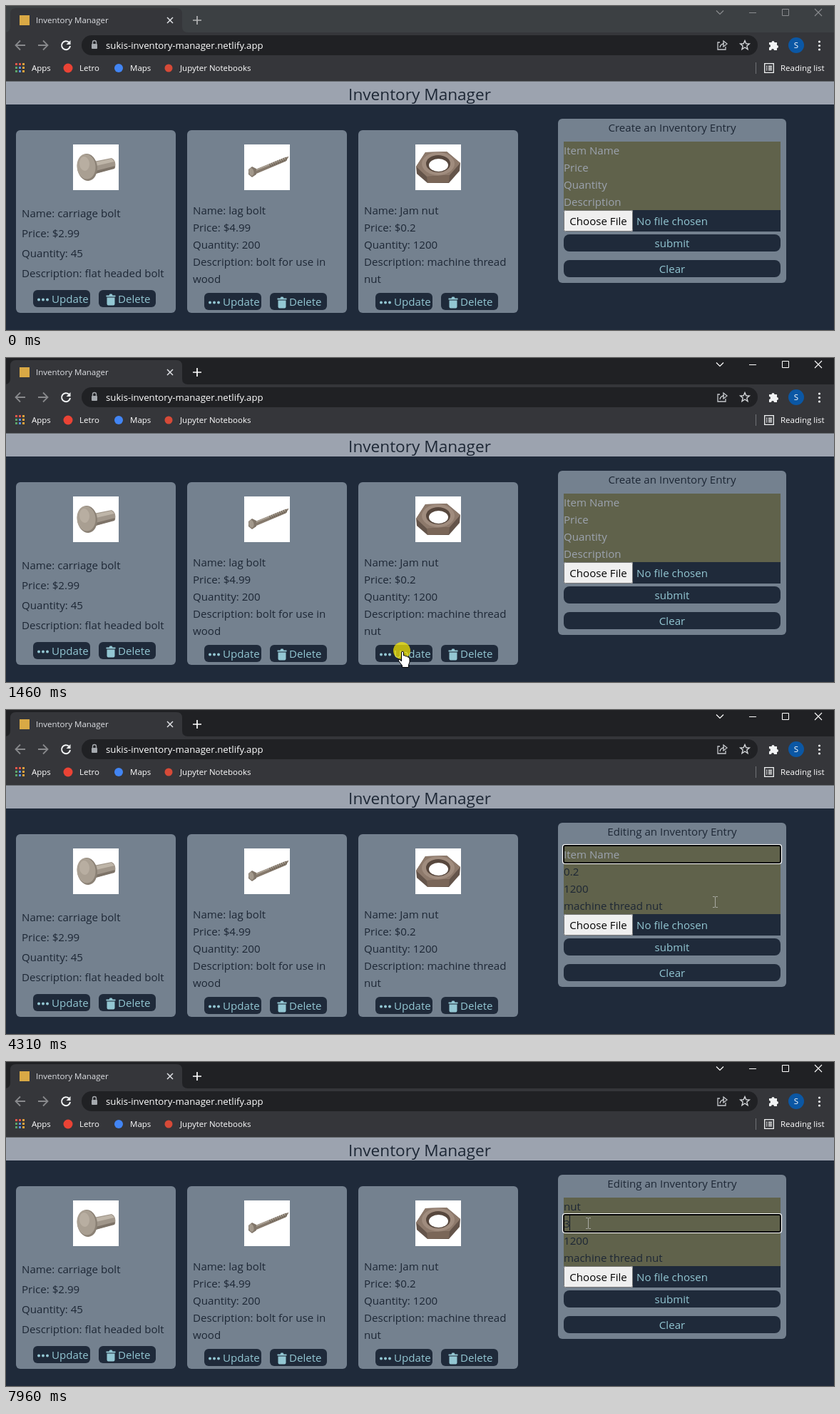
An HTML page with a canvas for the animation above (8 s loop, 1161 px wide and 454 px high).

```html
<!DOCTYPE html>
<html lang="en">
<head>
<meta charset="utf-8">
<title>Inventory Manager</title>
<style>
  html, body { margin: 0; width: 100%; height: 100%; overflow: hidden; background: #1f2937; }
  canvas { display: block; }
</style>
</head>
<body>
<canvas id="stage" width="1161" height="454"></canvas>
<script>
const c = document.getElementById('stage').getContext('2d');
const LOOP = 8000, STEP = 67;
const NAVY = '#1f2a3a', CARD = '#74818f', SKY = '#93c7d3', OLIVE = '#60624b';
const BAR = '#35363a', PALE = '#9ca3af', INK = '#1d2735', LIGHT = '#f1f3f4';
const BODY = 15.1, SMALL = 11.5;

// ---- drawing helpers ----
function text(s, x, y, size, color, align = 'left', weight = 400) {
  c.font = `${weight} ${size}px "Open Sans", "Noto Sans", sans-serif`;
  c.textAlign = align;
  c.fillStyle = color;
  c.fillText(s, x, y);
}
function width(s) {
  c.font = `${BODY}px "Open Sans", "Noto Sans", sans-serif`;
  return c.measureText(s).width;
}
function rect(x, y, w, h, color) {
  c.fillStyle = color;
  c.fillRect(x, y, w, h);
}
function round(x, y, w, h, r, color) {
  c.beginPath();
  c.roundRect(x, y, w, h, r);
  c.fillStyle = color;
  c.fill();
}
function frame(x, y, w, h, r, color, line) {
  c.beginPath();
  c.roundRect(x, y, w, h, r);
  c.strokeStyle = color;
  c.lineWidth = line;
  c.stroke();
}
function oval(x, y, rx, ry, turn, color) {
  c.beginPath();
  c.ellipse(x, y, rx, ry, turn, 0, 7);
  c.fillStyle = color;
  c.fill();
}
const dot = (x, y, r, color) => oval(x, y, r, r, 0, color);
// SVG path placed at x, y
function path(d, x, y, fill, stroke, line = 1) {
  const p = new Path2D(d);
  c.save();
  c.translate(x, y);
  if (fill) { c.fillStyle = fill; c.fill(p); }
  if (stroke) { c.strokeStyle = stroke; c.lineWidth = line; c.stroke(p); }
  c.restore();
}

// ---- browser frame ----
function drawBrowser(active) {
  rect(0, 0, 1161, 37, active ? '#202124' : '#3c4043');
  path('M-2 37Q6 37 6 29V11Q6 3 14 3H239Q247 3 247 11V29Q247 37 255 37Z', 0, 0, BAR);
  rect(0, 37, 1161, 68, BAR);
  rect(0, 105, 1161, 1, '#5f6368');
  rect(19, 13, 14, 14, '#d9a945');
  text('Inventory Manager', 42, 24, SMALL, '#dfe1e5');
  path('M-4 -4L4 4M4 -4L-4 4', 230, 20, null, '#dfe1e5', 1.5);
  path('M-6 0H6M0 -6V6', 268, 20, null, active ? '#fff' : '#b4b5b7', 1.7);

  const ctl = active ? '#fff' : '#8a8c8f';
  path('M-5 -2.5L0 2.5L5 -2.5', 1001, 9, null, ctl, 1.2);
  path('M-5 .5H5', 1047, 9, null, ctl);
  path('M-4.5 -4.5H4.5V4.5H-4.5Z', 1093, 9, null, ctl);
  path('M-5 -5L5 5M5 -5L-5 5', 1139, 9, null, ctl, 1.1);

  const arrow = 'M7 0H-6M0 -6.5L-6.5 0L0 6.5';
  path(arrow, 20, 55, null, '#88898c', 1.8);
  c.save();
  c.translate(52, 55);
  c.scale(-1, 1);
  path(arrow, 0, 0, null, '#88898c', 1.8);
  c.restore();
  path('M4.2 -4.2A6 6 0 1 0 6 1', 84, 55, null, LIGHT, 2);
  path('M6.5 -7V-1H.5Z', 84, 55, LIGHT);

  round(106, 41, 948, 28, 14, '#202124');
  round(120, 53, 8, 7, 1, '#a5a9ae');
  path('M-2.5 0V-2A2.5 2.5 0 0 1 2.5 -2V0', 124, 53, null, '#a5a9ae', 1.4);
  text('sukis-inventory-manager.netlify.app', 140, 60, 13.2, '#fff', 'left', 500);
  path('M-3 -4H-6V6H5V2M-3 3Q-2 -2 3 -2M2 -6L7 -2L2 2Z', 1004, 55, null, '#c6c9cd', 1.3);
  path('M0 -6.5L1.8 -2.2L6.3 -2L2.8 1L4 5.6L0 3L-4 5.6L-2.8 1L-6.3 -2L-1.8 -2.2Z', 1036, 55, null, '#d2d5d8', 1.4);
  path('M-6 -4H-2.5A2 2 0 1 1 1.5 -4H5V0A2 2 0 1 1 5 4V7H1A2 2 0 1 0 -3 7H-6V3A2 2 0 1 0 -6 -1Z', 1076, 55, LIGHT);
  dot(1108, 55, 11, '#0b57a4');
  text('S', 1108, 59, 11.5, '#fff', 'center');
  for (const y of [50, 55.5, 61]) dot(1140.5, y, 1.6, LIGHT);

  const hues = ['#e8574a', '#e8574a', '#e8a33c', '#5aa469', '#5b8fe0', '#e8a33c', '#5aa469', '#5b8fe0', '#e8a33c'];
  hues.forEach((h, i) => rect(13 + i % 3 * 5, 80 + Math.floor(i / 3) * 5, 3, 3, h));
  dot(87, 87, 6.5, '#ea4335');
  dot(158, 87, 6, '#4285f4');
  dot(228, 87, 5.5, '#d64a38');
  const marks = [['Apps', 36], ['Letro', 103], ['Maps', 174], ['Jupyter Notebooks', 244], ['Reading list', 1086]];
  for (const [s, x] of marks) text(s, x, 91, SMALL, '#fff', 'left', 500);
  rect(1051, 79, 1, 16, '#707276');
  path('M.7 .7H13.3V13.3H.7ZM3 4.5H4.5M6 4.5H11M3 7H4.5M6 7H11M3 9.5H4.5M6 9.5H11', 1063, 80, null, LIGHT, 1.3);
}

// ---- product pictures, 64 by 64 ----
function carriageBolt() {
  path('M24 25L54 19Q61 22 59 33L28 42Z', 0, 0, '#a0968a');
  path('M26 26L54 20L58 24L28 31Z', 0, 0, '#beb5a8');
  path('M28 38L59 30L58 34L28 42Z', 0, 0, '#7d7368');
  oval(20, 32, 14, 19, -.1, '#8b8175');
  oval(18.500, 31, 13, 17.500, -.1, '#a99f92');
  oval(16, 27, 7, 10, -.1, '#b8aea1');
}
function lagBolt() {
  path('M13 37L56 19.500L61 18L58 23L15 41Z', 0, 0, '#85796c', '#85796c', 1.5);
  path('M14 37L59 19', 0, 0, null, '#ada396', 1.6);
  c.setLineDash([1, 2]);
  path('M36 29.500L60 19.500', 0, 0, null, '#6d6357', 5);
  c.setLineDash([]);
  path('M6 35L11 31L17 34L17 42L11 46L6 42Z', 0, 0, '#81766a');
  oval(10, 38.5, 3.500, 5.500, -.2, '#a2988b');
}
function jamNut() {
  path('M1 31L14 11L44 10L63 26L62 37L47 54L17 54L2 41Z', 0, 0, '#64544a');
  path('M1 31L14 11L44 10L63 26L48 43L16 45Z', 0, 0, '#8d796b');
  path('M16 45L48 43L47 53L17 54Z', 0, 0, '#7a6658');
  oval(32, 27, 23, 16, 0, '#a08c7e');
  oval(32, 27, 17, 12, 0, '#57473d');
  oval(32.5, 29, 13.5, 9, 0, '#fff');
}

// ---- inventory cards ----
const cards = [
  { x: 14, top: 296, gap: 28, button: 398, draw: carriageBolt,
    lines: ['Name: carriage bolt', 'Price: $2.99', 'Quantity: 45', 'Description: flat headed bolt'] },
  { x: 254, top: 292, gap: 24, button: 402, draw: lagBolt,
    lines: ['Name: lag bolt', 'Price: $4.99', 'Quantity: 200', 'Description: bolt for use in', 'wood'] },
  { x: 494, top: 292, gap: 24, button: 402, draw: jamNut,
    lines: ['Name: Jam nut', 'Price: $0.2', 'Quantity: 1200', 'Description: machine thread', 'nut'] }
];
function drawCard({ x, top, gap, button, draw, lines }) {
  round(x, 174, 224, 256, 6, CARD);
  rect(x + 80, 194, 64, 64, '#fff');
  c.save();
  c.translate(x + 80, 194);
  draw();
  c.restore();
  lines.forEach((s, i) => text(s, x + 8, top + i * gap, BODY, INK));
  round(x + 24, button, 80, 24, 6, NAVY);
  round(x + 116, button, 80, 24, 6, NAVY);
  for (let i = 0; i < 3; i++) dot(x + 32 + i * 6, button + 13.5, 2, SKY);
  text('Update', x + 50, button + 18, BODY, SKY);
  path('M0 2H4L5 0H8L9 2H13V4H0ZM1 5H12V14Q12 16 10 16H3Q1 16 1 14Z', x + 126.5, button + 5.5, SKY);
  text('Delete', x + 143, button + 18, BODY, SKY);
}

// ---- form ----
const EDIT = 1590, FOCUS = [2610, 6400];
const hints = ['Item Name', 'Price', 'Quantity', 'Description'];
const stored = ['Jam nut', '0.2', '1200', 'machine thread nut'];
// typed values of the first two fields: [time, value]
const edits = [
  [[3510, 'Jam nu'], [3640, 'Jam n'], [3780, 'Jam '], [3890, 'Jam'], [4000, 'Ja'], [4110, 'J'],
   [4310, ''], [5040, 'n'], [5230, 'nu'], [5370, 'nut']],
  [[7370, ''], [7960, '3']]
];
function fieldState(i, t) {
  let value = t < EDIT ? '' : stored[i], last = FOCUS[i] || 0;
  for (const [at, v] of edits[i] || []) if (t >= at) { value = v; last = at; }
  return { value, last };
}
function drawForm(t) {
  const focus = t < FOCUS[0] ? -1 : t < FOCUS[1] ? 0 : 1;
  round(774, 158, 320, 230, 6, CARD);
  text((t < EDIT ? 'Create' : 'Editing') + ' an Inventory Entry', 934, 176, BODY, INK, 'center');
  rect(782, 190, 304, 96, OLIVE);
  hints.forEach((hint, i) => {
    const { value, last } = fieldState(i, t);
    text(value || hint, 782, 208 + i * 24, BODY, value ? INK : PALE);
    if (i === focus && value && (t - last) % 1000 < 500)
      rect(Math.round(782 + width(value)) - 1, 191 + i * 24, 1, 21, '#111827');
  });
  rect(782, 286, 304, 30, NAVY);
  round(782, 286, 97, 30, 2, '#efefef');
  frame(782.5, 286.5, 96, 29, 2, '#777', 1);
  text('Choose File', 830.5, 307, BODY, '#000', 'center');
  text('No file chosen', 884, 307, BODY, SKY);
  round(782, 320, 304, 24, 8, NAVY);
  text('submit', 934, 338, BODY, SKY, 'center');
  round(782, 356, 304, 24, 8, NAVY);
  text('Clear', 934, 374, BODY, SKY, 'center');
  if (focus >= 0) {
    const y = 188 + focus * 24;
    frame(782, y + 2, 304, 24, 2, '#000', 2);
    frame(780.5, y + .5, 307, 27, 3.5, '#fff', 1.2);
  }
}

// ---- pointer ----
const track = [
  [850, 655, 480], [1390, 556, 411], [1650, 556, 411], [1720, 558, 410], [1780, 559, 413],
  [1913, 559, 413], [2250, 869, 232], [2560, 893, 205], [2710, 893, 206], [2780, 894, 219],
  [2850, 946, 246], [2910, 994, 269], [5773, 994, 269], [5840, 982, 263], [6370, 799, 228],
  [6570, 796, 226], [6973, 796, 226], [7230, 816, 226]
];
const presses = [[1390, 1590], [2610, 2720], [6370, 6470]];

function pointerAt(t) {
  if (t >= 7230) return [816, 226];
  const i = track.findIndex(k => k[0] > t) - 1;
  const [t0, x0, y0] = track[i], [t1, x1, y1] = track[i + 1];
  const f = Math.min(1, Math.floor((t - t0) / STEP + .02) * STEP / (t1 - t0));
  return [x0 + (x1 - x0) * f, y0 + (y1 - y0) * f];
}
const inside = (x, y, l, t, w, h) => x >= l && x < l + w && y >= t && y < t + h;
const overButton = (x, y) => cards.some(k =>
  inside(x, y, k.x + 24, k.button, 80, 24) || inside(x, y, k.x + 116, k.button, 80, 24));

const HAND = 'M-1.5 1Q0 -1 1.5 1V6Q3 5 4.5 7Q6 6 7.5 8Q10 8 10 11V15L8.5 19V22.5H-.5V20L-5.5 13.5' +
  'Q-6 11 -4 11.5L-1.5 14Z';
const ARROW = 'M0 0V16L4 12.5L6.5 18L9 17L6.5 11.5H11.5Z';
const BEAM = 'M-3.5 -7.5H-1Q0 -7.5 0 -6Q0 -7.5 1 -7.5H3.5M0 -6V6M-3.5 7.5H-1Q0 7.5 0 6Q0 7.5 1 7.5H3.5';

function drawPointer(t) {
  if (t < 920) return;
  const [x, y] = pointerAt(t);
  if (presses.some(([a, b]) => t >= a && t < b)) dot(x - 1, y - 1, 12, 'rgba(255,240,0,.7)');
  if (inside(x, y, 782, 190, 304, 96)) path(BEAM, Math.floor(x) + .5, Math.floor(y), null, '#a9aaa2');
  else if (overButton(x, y)) path(HAND, x, y, '#fff', '#000');
  else path(ARROW, x, y, '#fff', '#000');
}

function render(t) {
  rect(0, 0, 1161, 454, NAVY);
  drawBrowser(t >= 1460);
  rect(0, 106, 1161, 32, PALE);
  text('Inventory Manager', 580, 132, 22.6, INK, 'center');
  cards.forEach(drawCard);
  drawForm(t);
  drawPointer(t);
}

const start = performance.now();
function tick() {
  render((performance.now() - start) % LOOP);
  requestAnimationFrame(tick);
}
tick();
</script>
</body>
</html>
```
